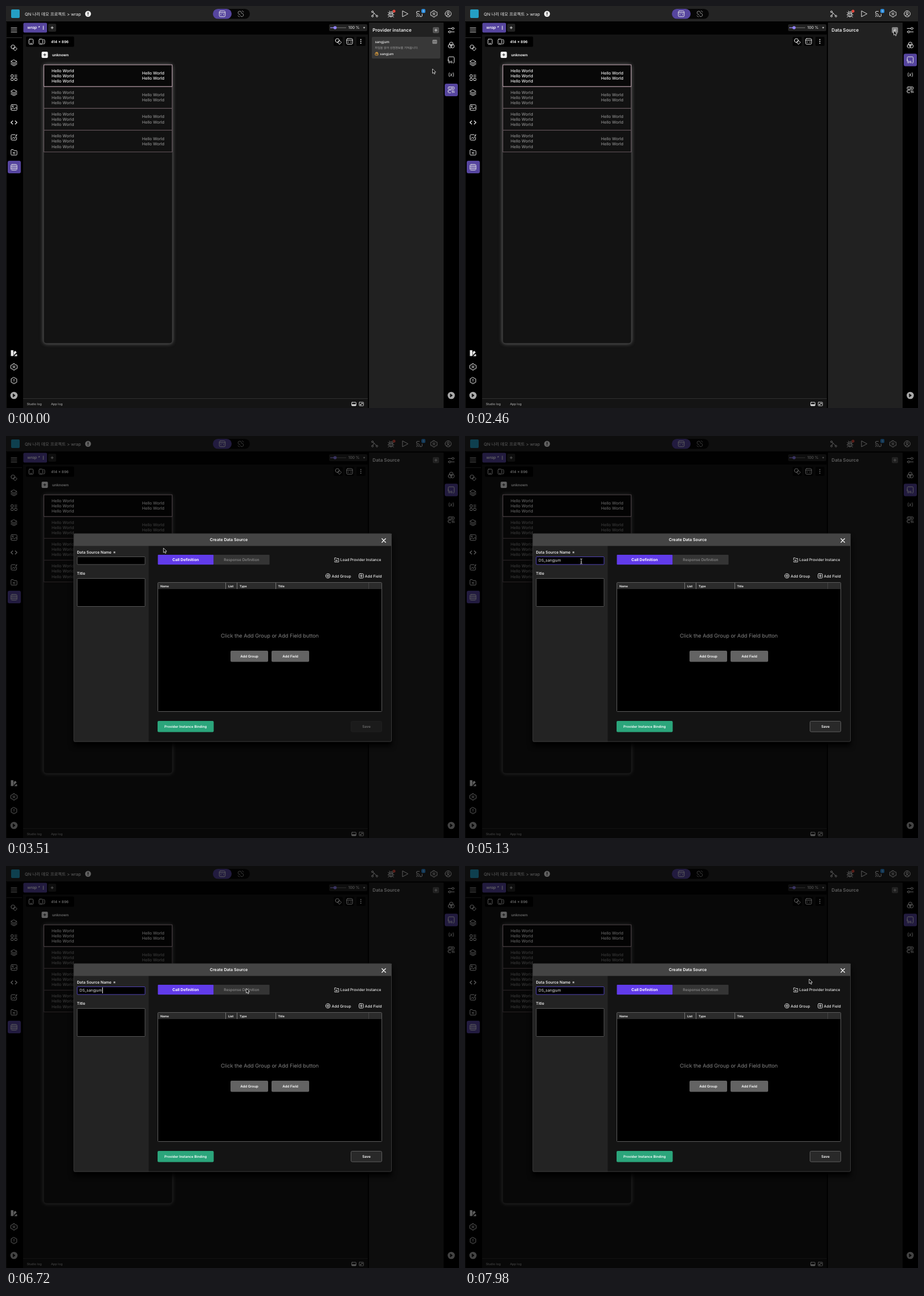
Write an HTML page that moves like this. It is 795 px wide and 704 px high and loops after 8000 ms.

```html
<!DOCTYPE html>
<html lang="ko">
<head>
<meta charset="utf-8">
<style>
html, body { margin: 0; width: 100%; height: 100%; overflow: hidden; background: #000; }
svg { display: block; width: 795px; height: 704px; }
text { font-family: Inter, "Noto Sans CJK KR", "Noto Sans CJK", sans-serif; text-rendering: geometricPrecision; white-space: pre; }
.i { fill: none; stroke: #e4e4e4; stroke-width: 1; stroke-linecap: round; stroke-linejoin: round; }
#phone { filter: drop-shadow(0 0 3px #666); }
#dialog { filter: drop-shadow(0 7px 5px #000); }
</style>
</head>
<body>
<svg id="stage" viewBox="0 0 795 704"></svg>
<script>
const PURPLE = '#56459f';
const rect = (x, y, w, h, fill, r = 0, extra = '') =>
  `<rect x="${x}" y="${y}" width="${w}" height="${h}" fill="${fill}" rx="${r}" ${extra}/>`;
const box = (x, y, w, h, fill, line, r = 0, extra = '') =>
  rect(x + .5, y + .5, w - 1, h - 1, fill, r, `stroke="${line}" ${extra}`);
const text = (x, y, s, size, weight = 400, fill = '#eee', extra = '') =>
  `<text x="${x}" y="${y}" font-size="${size}" font-weight="${weight}" fill="${fill}" ${extra}>${s}</text>`;
const mid = (x, y, s, size, weight, fill) => text(x, y, s, size, weight, fill, 'text-anchor="middle"');
const path = (x, y, d, extra = '') => `<path class="i" transform="translate(${x} ${y})" d="${d}" ${extra}/>`;
const ring = (x, y, r) => `M${x - r} ${y}a${r} ${r} 0 1 0 ${2 * r} 0a${r} ${r} 0 1 0 ${-2 * r} 0`;
const frame = (x, y, w, h, r = 1.5) =>
  `M${x + r} ${y}h${w - 2 * r}q${r} 0 ${r} ${r}v${h - 2 * r}q0 ${r} ${-r} ${r}h${2 * r - w}q${-r} 0 ${-r} ${-r}v${2 * r - h}q0 ${-r} ${r} ${-r}z`;
const hexagon = 'M0-5.6L4.9-2.8V2.8L0 5.6L-4.9 2.8V-2.8Z';

const icons = {
  menu: 'M-5-3.5H5M-5 0H5M-5 3.5H5',
  shapes: ring(-1.8, -1.6, 3.4) + 'M2-1.7L5.4 1.7L2 5.2L-1.5 1.7Z',
  layers: 'M0-5L5.2-2.2L0 .6L-5.2-2.2ZM-5.2 .3L0 3L5.2 .3M-5.2 2.6L0 5.4L5.2 2.6',
  grid: frame(-5.2, -5, 4, 4, .6) + frame(-5.2, 1, 4, 4, .6) + frame(1.2, 1, 4, 4, .6) + 'M1.2-4.4H5.2M1.2-1.6H5.2',
  image: frame(-5.2, -5, 10.4, 10) + ring(-2, -2, 1) + 'M-5 3L-1.5 .6L1 2.4L3 0L5 1.6',
  code: 'M-2.3-2.8L-5.2 0L-2.3 2.8M2.3-2.8L5.2 0L2.3 2.8',
  edit: 'M2-4.8H-3.6Q-5-4.8-5-3.3V3.2Q-5 4.8-3.5 4.8H3Q4.6 4.8 4.6 3V0M-3.4 2.2L-1 0L1.4 2L5-4.4M3-3.2L5-4.8',
  folder: 'M-5.2-3.8Q-5.2-4.8-4.2-4.8H-1.4L.2-3H4.2Q5.2-3 5.2-2V3.7Q5.2 4.8 4.2 4.8H-4.2Q-5.2 4.8-5.2 3.7ZM0 2.6L-1.8 .7Q-1-.8 0 .4Q1-.8 1.8 .7Z',
  table: frame(-5.2, -5, 10.4, 10, 2) + 'M-5.2-1.7H5.2M-5.2 1.7H5.2M-2.6-3.4H-2.4M-2.6 0H-2.4M-2.6 3.4H-2.4M0-3.4H.1M0 0H.1M0 3.4H.1M2.6-3.4H2.7M2.6 0H2.7M2.6 3.4H2.7',
  gear: 'M-1.5-5.4H1.5L2-3.9L3.4-3.2L4.9-3.5L6 -1L4.9 0L6 1L4.9 3.5L3.4 3.2L2 3.9L1.5 5.4H-1.5L-2 3.9L-3.4 3.2L-4.9 3.5L-6 1L-4.9 0L-6-1L-4.9-3.5L-3.4-3.2L-2-3.9Z' + ring(0, 0, 1.7),
  alert: hexagon + 'M0-2.6V.6M0 2.5V2.6',
  sliders: 'M-5.4-3H.8M5-3H5.4M-5.4 3H-4.6M-.8 3H5.4' + ring(2.9, -3, 1.8) + ring(-2.7, 3, 1.8),
  venn: ring(0, -2, 3.2) + ring(-2.1, 1.8, 3.2) + ring(2.1, 1.8, 3.2),
  data: 'M-5.2 2V-4Q-5.2-5.6-3.6-5.6H3.6Q5.2-5.6 5.2-4V3.8Q5.2 5.4 3.6 5.4M-5.2-1V1',
  server: frame(-5.4, -5.2, 10.8, 4.2) + 'M-5.4 2.6V1.8Q-5.4 .4-4 .4H-1M-5.4 2V3.6Q-5.4 5-4 5H-1M-3-3.1H-2.8M-.5-3.1H3M2 5V1L.8 2.2M4.4 1V5L5.6 3.8',
  branch: ring(-3.8, -3.9, 1.5) + ring(-3.8, 3.7, 1.5) + ring(4, 3.7, 1.5) + 'M-2.5-3L2.9 2.6M-1 -1.5L-3.2 2.3',
  bug: 'M-3-1Q-3-3.7 0-3.7Q3-3.7 3-1V2Q3 5 0 5Q-3 5-3 2ZM-3-1H3M0-1V5M-3 1.5H-5.4M3 1.5H5.4M-2.9-.8L-5-2.8M2.9-.8L5-2.8M-2.6 3.7L-4.8 5.4M2.6 3.7L4.8 5.4M-1.6-3.5L-2.5-5.2M1.6-3.5L2.5-5.2',
  play: 'M-4.3-5L5 0L-4.3 5Z',
  cast: 'M0-4.6H-3.5Q-5-4.6-5-3V-2M2 4.6H3Q4.8 4.6 4.8 3V0M-5 1.2Q-1.5 1.2-1.5 4.6M-5-1.2Q1-1.2 1 4.6M-5 3.8V4.6H-4.2',
  user: ring(0, 0, 5.3) + ring(0, -1.4, 1.8) + 'M-3.4 4Q-2.7 1.7 0 1.7Q2.7 1.7 3.4 4',
  window: frame(-5.2, -5, 10.4, 10, 2) + 'M-5.2-2H5.2M-2 .4L-3 1.4L-2 2.4M2 .4L3 1.4L2 2.4',
  link: 'M-1.4 1.2A3 3 0 1 1 1.2-2M1.2-1A3 3 0 1 1-1 3M-5 3.2A5 5 0 0 0-2.4 5.2M2.6-5.2A5 5 0 0 1 5-3',
  phone: frame(-3.7, -4.5, 7.4, 9) + 'M-1 2.8H1',
  phones: frame(-5, -4.5, 6.6, 9) + 'M3-4Q5-3.7 5-2V2Q5 4 3 4.2M-2.5 2.8H-1',
  plus: 'M-2 0H2M0-2V2'
};
const icon = (name, x, y, extra) => path(x, y, icons[name], extra);
const disc = (x, y, r, fill) => `<circle cx="${x}" cy="${y}" r="${r}" fill="${fill}"/>`;
const dots = (x, y, gap, fill = '#eee') => [-gap, 0, gap].map(d => disc(x, y + d, .95, fill)).join('');
const go = (x, y) => disc(x, y, 6.3, '#a9a9a9') + path(x, y, 'M-1.3-2.5L2 0L-1.3 2.5Z', 'style="fill:#111;stroke:#111"');

function header() {
  return rect(0, 0, 795, 27, '#242424') + rect(9, 6, 15, 15, '#249fc4', 2) +
    text(33, 16.6, 'QN 나리 데모 프로젝트 &gt; wrap', 7.4) +
    disc(144, 13.7, 5.2, '#f2f2f2') + path(144, 13.7, 'M0-2.5V.6M0 2.5V2.6', 'style="stroke:#222;stroke-width:1.4"') +
    rect(363, 5, 65, 17.5, '#060606', 8.7) + rect(363, 5, 33, 17.5, PURPLE, 8.7) +
    icon('window', 379.5, 13.7) + icon('link', 412, 13.7, 'opacity=".6"') +
    icon('branch', 647, 14) + icon('bug', 675.5, 14) + disc(681, 9, 2.5, '#e2483d') +
    icon('play', 700.5, 13.7) + icon('cast', 725.5, 14) + rect(729, 5.2, 7, 7, '#2d8fe0', 2) +
    mid(732.5, 10.7, '1', 5, 500, '#fff') + icon('gear', 751, 13.7) + icon('user', 776, 13.7);
}

function leftBar() {
  const names = ['shapes', 'layers', 'grid', 'layers', 'image', 'code', 'edit', 'folder', 'table'];
  return rect(0, 28, 29, 676, '#000') + rect(0, 28, 1, 676, '#1c1c1c') + rect(3, 271, 23, 22, PURPLE, 3) +
    icon('menu', 14, 42) + rect(1, 55, 27, 1, '#333') +
    names.map((n, k) => icon(n, 14, 73.2 + 26.15 * k, n === 'code' ? 'style="stroke-width:1.4"' : '')).join('') +
    path(14, 608, 'M-5-5H-1.2V4.8H-5ZM0-1.8L2-4L4.4-1.5L0 3ZM1 4.8L3.5 2.2H5.2V4.8Z', 'style="fill:#eee;stroke-width:.5"') +
    icon('gear', 14, 632) + icon('alert', 14, 656) + go(14, 682);
}

function canvas() {
  const row = k => {
    const y = 103 + 38.2 * k, first = k === 0, fill = first ? '#f5f5f5' : '#8e8e8e';
    const hello = (x, dy) => text(x, y + dy, 'Hello World', 7.1, 500, fill);
    return rect(66.5, y, 225, 38, first ? '#080808' : '#121212', 0, `stroke="${first ? '#c2a6b2' : '#65575d'}"`) +
      [12.5, 21.7, 30.9].map(d => hello(80, d)).join('') + [17, 26.2].map(d => hello(238.7, d)).join('');
  };
  return rect(30, 28, 605, 676, '#141414') + rect(30, 28, 605, 22, '#020202') +
    rect(30.5, 29.5, 41.5, 17, PURPLE, 2) + text(37.5, 40.2, 'wrap *', 6.8, 600, '#fff', 'font-style="italic"') +
    dots(65.5, 38, 2.4) + rect(74, 31, 14, 14, '#222', 2) + icon('plus', 81, 38) +
    rect(567, 32, 67, 12, '#222', 2) + rect(569, 37.5, 28, 1, '#777') + rect(569, 37.4, 8, 1.2, '#8272e8') +
    disc(577.5, 38, 2.8, '#8f80f2') + text(600.7, 40.4, '100 %', 6.7) + path(628.7, 38, 'M-1.2-.8H1.2L0 1Z', 'style="fill:#eee;stroke-width:.5"') +
    rect(35, 53.5, 84.5, 18, '#000', 2) + icon('phone', 44, 62.5) + icon('phones', 63, 62.5) + text(79, 64.8, '414 × 896', 6.4, 700) +
    [575, 595, 615].map(x => rect(x, 54, 16, 16, '#050505', 2)).join('') +
    icon('shapes', 583.3, 62) + icon('window', 603, 62) + dots(622.7, 62, 3.2) +
    rect(62.5, 80, 11, 11, '#f2f2f2', 2) + icon('plus', 68, 85.5, 'style="stroke:#222"') + text(81, 87.8, 'unknown', 6.4, 700) +
    `<g id="phone">${box(65.5, 102, 227, 489.5, '#131313', '#3c3c3c', 5)}</g>` + [1, 2, 3, 0].map(row).join('') +
    rect(30, 687, 605, 1, '#303030') + text(36.5, 698.8, 'Studio log', 5.5, 400, '#bbb') + text(79, 698.8, 'App log', 5.5, 400, '#bbb') +
    path(610.5, 697, frame(-3.8, -3, 7.6, 6, .8)) + rect(607, 697.5, 7, 2.5, '#ddd') +
    path(623.7, 697, frame(-3.8, -3.2, 7.6, 6.4, .8) + 'M-2 1.6L2-1.6M.4-1.6H2V0M-2 0V1.6H-.4', 'style="stroke-width:.8"');
}

function panel() {
  return rect(635, 28, 160, 676, '#000') + rect(637, 29, 131, 675, '#212121') +
    `<g id="provider">${text(643.3, 45, 'Provider instance', 8.1, 600)}${rect(642, 54, 120, 38, '#383838', 2)}` +
    text(647.5, 65, 'sangjum', 6.2, 500) + rect(748.3, 59, 8.2, 7.2, '#858585', 1.5) + path(752.4, 62.6, 'M-2 0H-1.9M0 0H.1M2 0H2.1', 'style="stroke:#333"') +
    text(647.5, 74.7, '파일을 읽어 상점정보를 가져옵니다.', 5.1, 400, '#a5a5a5') +
    path(650.5, 83.7, frame(-2.5, -1.2, 5, 3.6, .5) + 'M-1.3-1.2V-2.6H1.6V-1.2M0 .2H1', 'style="stroke:#e3a13a"') +
    text(656.3, 86, 'sangjum', 5.9, 500) + '</g>' +
    `<g id="source">${text(643.3, 45, 'Data Source', 8.1, 600)}</g>` +
    rect(749, 37, 11, 10.6, '#555', 2, 'id="add"') + icon('plus', 754.5, 42.3, 'style="stroke:#ccc"') +
    rect(770, 136, 23, 22, PURPLE, 3, 'id="active"') +
    ['sliders', 'venn', 'data', '', 'server'].map((n, k) => n && icon(n, 781.4, 42.3 + 26.15 * k)).join('') +
    mid(780, 99.6, 'DS', 5.4, 700) + mid(781.4, 123.3, '(<tspan font-style="italic">x</tspan>)', 8.6, 400) + go(781.4, 682);
}

function dialog() {
  const bar = x => rect(x, 257, 1, 11, '#777');
  const gray = (x, s) => rect(x, 376, 66, 19.5, '#636363', 2) + mid(x + 33, 388, s, 6.1, 600, '#fff');
  return rect(119, 171, 558, 364.5, '#141414', 2) + rect(119, 192, 131.5, 343.5, '#232323') +
    rect(119, 171, 558, 21.5, '#444') + box(118.5, 170.5, 558.5, 365, 'none', '#393939', 2) +
    mid(391, 184.2, 'Create Data Source', 7.1, 600, '#fff') + path(663, 183, 'M-3.2-3.2L3.2 3.2M3.2-3.2L-3.2 3.2', 'style="stroke:#fff;stroke-width:1.3"') +
    text(124.5, 205.5, 'Data Source Name', 6.75, 600) + path(190.3, 203.8, 'M-1.5 0H1.5M-.8-1.4L.8 1.4M.8-1.4L-.8 1.4', 'style="stroke-width:.7"') +
    box(124.5, 211, 120, 14.5, '#000', '#555', 1, 'id="field"') + `<g id="typed">${text(129, 220.3, 'DS_sangjum', 6.8)}</g>` +
    rect(169, 212.5, 1, 10.5, '#eee', 0, 'id="caret"') +
    text(124.5, 243.4, 'Title', 6.75, 600) + box(124.5, 249, 120, 50, '#000', '#555', 1) +
    rect(266.5, 208, 98, 17.2, '#613bea', 1) + rect(364.5, 208, 98, 17.2, '#343434', 1) +
    mid(315.3, 219, 'Call Definition', 6.8, 700, '#fff') + mid(413.4, 219, 'Response Definition', 6.5, 500, '#8c8c8c') +
    path(580.3, 217, 'M-3.5 0V-3.6H-1L0-2.5H3.6V3.7H-3.5V2.5M-2.5 1H1M-.2-.2L1 1L-.2 2.2', 'style="stroke-width:.9"') +
    text(586.8, 219.2, 'Load Provider Instance', 6.5, 500) +
    path(565, 245, ring(0, 0, 3.8) + icons.plus) + text(571.5, 247.5, 'Add Group', 6.65, 500) +
    path(623.4, 245, frame(-3.8, -3.8, 7.6, 7.6) + icons.plus) + text(629.8, 247.5, 'Add Field', 6.65, 500) +
    box(266, 256, 394, 227, '#000', '#5c5c5c', 1) + rect(267, 257, 392, 11, '#2b2b2b') + [385, 405, 473].map(bar).join('') + rect(636, 257, 1, 11, '#444') +
    [[271, 'Name'], [390, 'List'], [410, 'Type'], [477.5, 'Title']].map(([x, s]) => text(x, 264.9, s, 5.2, 700)).join('') +
    mid(463, 352.5, 'Click the Add Group or Add Field button', 9.15, 400, '#858585') + gray(394, 'Add Group') + gray(466, 'Add Field') +
    rect(266, 499, 98.5, 19.5, '#2ba57b', 2) + mid(315.2, 511, 'Provider Instance Binding', 6, 600, '#fff') +
    box(605, 499, 55, 19.5, '#1b1b1b', '#1f1f1f', 2, 'id="save"') + `<g id="saveText">${mid(632.5, 511, 'Save', 6.2, 600, '#fff')}</g>`;
}

const cursors = `<g id="cursor" stroke-linejoin="round">
  <path id="arrow" d="M0 0V8L1.9 6.3L3.1 9.2L4.5 8.6L3.3 5.8H5.8Z" fill="#000" stroke="#eee" stroke-width=".8"/>
  <path id="hand" d="M0 0Q1-.7 1.5 .4V3L5 4Q5.6 4.4 5.4 5.5L4.6 8.4H.6L-2 5Q-1.6 4-.2 5Z" fill="#000" stroke="#eee" stroke-width=".8"/>
  <path id="beam" d="M-1.8-4.5Q0-4.5 0-3.3Q0-4.5 1.8-4.5M0-3.3V3.3M-1.8 4.5Q0 4.5 0 3.3Q0 4.5 1.8 4.5M-1 1.3H1" fill="none" stroke="#ddd" stroke-width=".9"/>
</g>`;

stage.innerHTML = rect(0, 0, 795, 704, '#000') + header() + leftBar() + canvas() + panel() +
  rect(0, 0, 795, 704, '#000', 0, 'id="shade"') + `<g id="dialog">${dialog()}</g>` + cursors;

const $ = id => document.getElementById(id);
const set = (id, name, value) => $(id).setAttribute(name, value);
const show = (id, on) => set(id, 'visibility', on ? 'visible' : 'hidden');
const ramp = (t, a, b) => Math.min(1, Math.max(0, (t - a) / (b - a)));

// pointer legs: start, end, x, y at the end
const legs = [[240, 810, 781, 95], [1560, 2310, 752.5, 43], [2700, 3750, 204, 219.5], [5790, 6720, 421.5, 214.5], [6720, 7980, 604, 198]];
function pointer(t) {
  let x = 748.5, y = 110;
  for (const [a, b, toX, toY] of legs) {
    const p = ramp(t, a, b), e = p * p * (3 - 2 * p);
    x += (toX - x) * e;
    y += (toY - y) * e;
  }
  return [x, y];
}

function draw(t) {
  const [x, y] = pointer(t);
  const switched = t >= 960, focused = t >= 4050, filled = t >= 4680;
  show('provider', !switched);
  show('source', switched);
  set('active', 'y', switched ? 83.5 : 136);
  set('add', 'fill', x > 748 && x < 761 && y > 36 && y < 49 ? '#858585' : '#555');

  set('shade', 'opacity', .6 * ramp(t, 2470, 2560));
  const fade = ramp(t, 2490, 2590);
  set('dialog', 'opacity', fade);
  show('dialog', fade > 0);
  set('field', 'stroke', focused ? '#5043b5' : '#555');
  set('typed', 'opacity', +filled);
  set('caret', 'x', filled ? 169 : 129.5);
  const blink = Math.floor((t - (filled ? 4680 : 4050)) / 450) % 2 === 0;
  set('caret', 'opacity', +(focused && blink));
  set('save', 'fill', filled ? '#292929' : '#1b1b1b');
  set('save', 'stroke', filled ? '#5c5c5c' : '#1f1f1f');
  set('saveText', 'opacity', filled ? 1 : .35);

  const overField = fade > 0 && x > 124 && x < 244 && y > 211 && y < 226;
  const overButton = x > 770;
  set('cursor', 'transform', `translate(${x} ${y})`);
  show('beam', overField);
  show('hand', overButton);
  show('arrow', !overField && !overButton);
}

function tick(now) {
  draw(now % 8000);
  requestAnimationFrame(tick);
}
draw(0);
requestAnimationFrame(tick);
</script>
</body>
</html>
```
